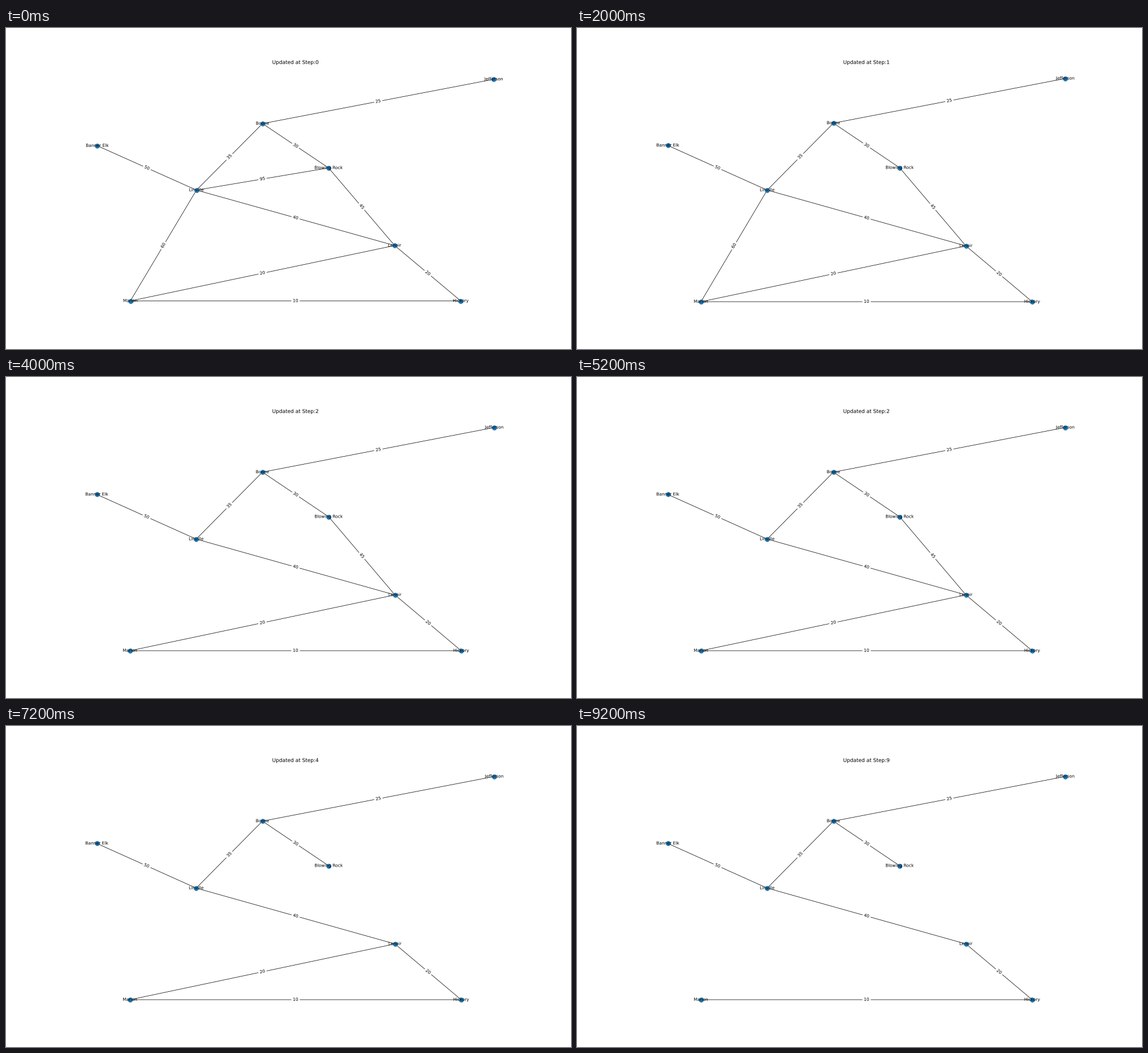
These frames come from a looping animation (993x564 px, 10 s). A matplotlib script:

```python
import matplotlib.pyplot as plt
import numpy as np
from matplotlib.animation import FuncAnimation
from matplotlib.patheffects import Normal

W, H, DPI = 993, 564, 64
PT = W / 18.5 / DPI  # one point of an 18.5 inch wide sheet

plt.rcParams.update({"font.family": "DejaVu Sans", "text.hinting": "no_hinting"})

TOWNS = {
    "Banner Elk": (0, 14), "Marion": (1, 0), "Linville": (3, 10),
    "Boone": (5, 16), "Blowing Rock": (7, 12), "Lenoir": (9, 5),
    "Hickory": (11, 0), "Jefferson": (12, 20),
}

# Start, end, weight, first state in which the road is gone
ROADS = [
    ("Linville", "Blowing Rock", 95, 1),
    ("Linville", "Marion", 60, 2),
    ("Blowing Rock", "Lenoir", 45, 3),
    ("Marion", "Lenoir", 20, 4),
    ("Banner Elk", "Linville", 50, 5),
    ("Boone", "Linville", 35, 5),
    ("Boone", "Blowing Rock", 30, 5),
    ("Boone", "Jefferson", 25, 5),
    ("Linville", "Lenoir", 40, 5),
    ("Lenoir", "Hickory", 20, 5),
    ("Marion", "Hickory", 10, 5),
]
STEPS = [0, 1, 2, 4, 9]

fig = plt.figure(figsize=(W / DPI, H / DPI), dpi=DPI, facecolor="white")
ax = fig.add_subplot()


def label(x, y, text, **kw):
    ax.text(x, y, text, size=10 * PT, ha="center", va="center",
            path_effects=[Normal()], **kw)


def draw_road(start, end, weight):
    ends = np.array([TOWNS[start], TOWNS[end]], float)
    ax.plot(*ends.T, color="black", lw=PT, zorder=1, snap=False)
    dx, dy = np.diff(ax.transData.transform(ends), axis=0)[0]
    angle = (np.degrees(np.arctan2(dy, dx)) + 90) % 180 - 90
    label(*ends.mean(axis=0), str(weight), rotation=angle,
          rotation_mode="default", zorder=1.5,
          bbox=dict(boxstyle="round", fc="white", ec="white", lw=PT))


def draw(state):
    ax.clear()
    ax.set_axis_off()
    # The first view is slightly wider than the later ones
    half_w, half_h = (6.626, 11.15) if state == 0 else (6.61, 11.072)
    ax.set_xlim(6 - half_w, 6 + half_w)
    ax.set_ylim(10 - half_h, 10 + half_h)
    ax.set_title(f"Updated at Step:{STEPS[state]}", size=12 * PT,
                 pad=6 * PT, path_effects=[Normal()])
    for start, end, weight, gone in ROADS:
        if state < gone:
            draw_road(start, end, weight)
    ax.scatter(*zip(*TOWNS.values()), s=(10 * PT) ** 2, c="#1f77b4",
               linewidths=1.5 * PT, zorder=2)
    for name, (x, y) in TOWNS.items():
        label(x, y, name, zorder=3)
    return []


anim = FuncAnimation(fig, draw, frames=len(STEPS), init_func=lambda: [],
                     interval=2000, repeat=True, repeat_delay=0)
plt.show()
```
